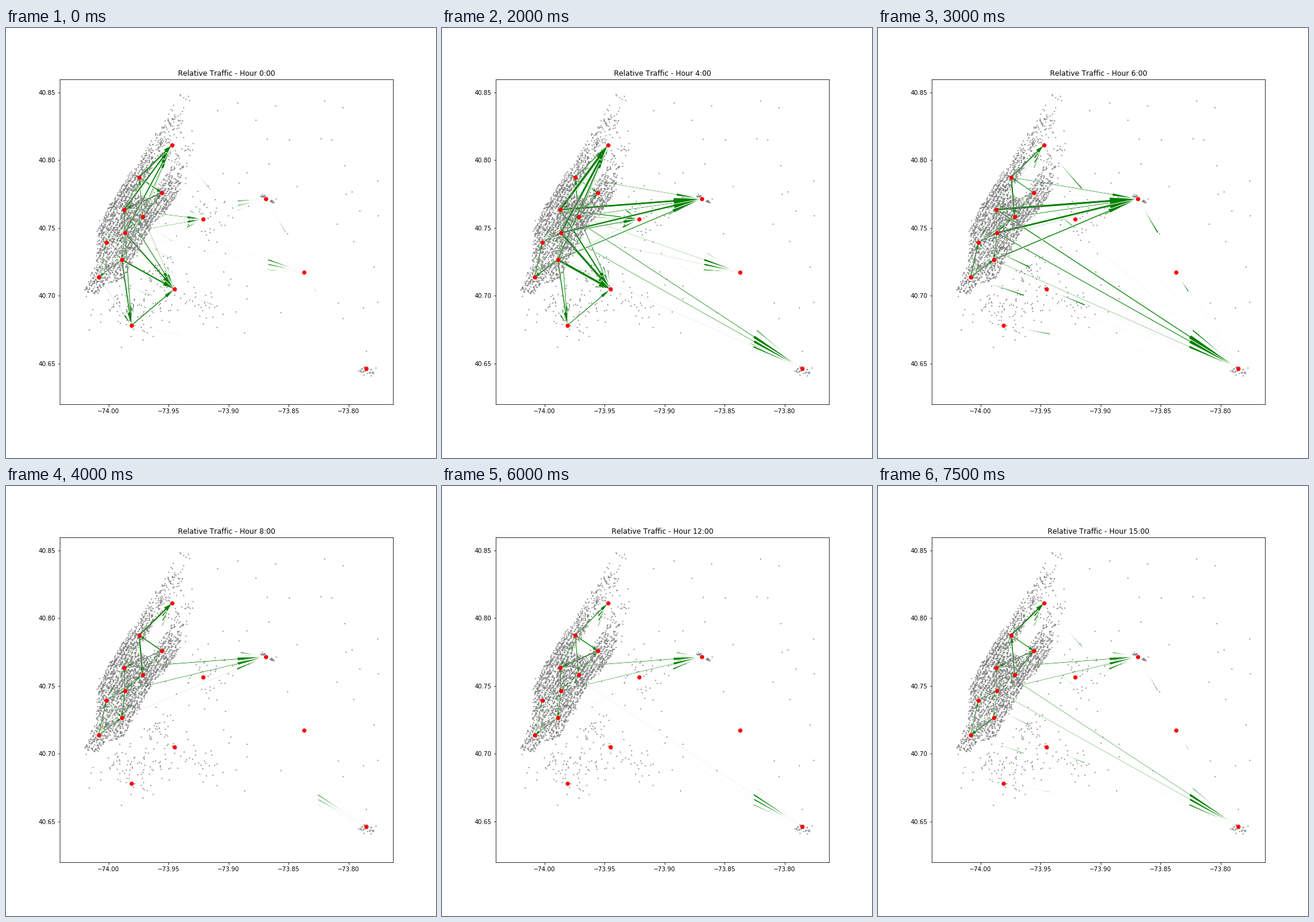
Recreate the animation shown at these times as a matplotlib script. Size 720x720 px, loop 8000 ms.

```python
import itertools

import matplotlib.pyplot as plt
import numpy as np
from matplotlib.animation import FuncAnimation
from matplotlib.collections import PolyCollection

plt.rcParams["font.family"] = "DejaVu Sans"
plt.rcParams["text.kerning_factor"] = 6

HOURS = 16
hour = np.arange(HOURS)
rng = np.random.default_rng(7)

# Zone centres in stage pixels; A to I lie on the island
ZONES = {
    "A": (278, 196), "B": (223, 250), "C": (261, 276), "D": (198, 304),
    "E": (229, 316), "F": (199, 343), "G": (168, 359), "H": (194, 388),
    "I": (155, 417), "J": (330, 320), "K": (282, 437), "L": (210, 498),
    "M": (435, 286), "N": (499, 409), "O": (603, 570),
}
ISLAND = "ABCDEFGHI"
OUTFLOW = dict(B=0.4, C=0.25, D=1, E=0.45, F=0.9, G=0.3, H=0.6, I=0.2)


def bump(peak, width):
    return np.exp(-(((hour - peak) / width) ** 2))


night = 1 / (1 + np.exp(3 * (hour - 4.7)))
day = 1 - night
late = night * (0.65 + 0.1 * hour)

# Head width in pixels by hour, and how much nearness counts
INBOUND = {
    "A": (14 * late + 3 * day, 0),
    "J": (7 * late + 0.8 * day, 1),
    "K": (14 * late, 2),
    "L": (8 * night, 2),
    "M": (2.2 * night + 5 * day + 11 * bump(4.9, 1.7), 0),
    "N": (4 * late, 0),
    "O": (8 * bump(5, 1.5) + 1.8 * day + 2.7 * bump(15, 3.5), 0),
}
FROM_O = 1.6 * bump(0, 1.2) + 2.8 * bump(6, 1.2) + 1.8 * bump(15, 2.5)
FROM_M = 1.7 * bump(0, 1.2) + 1.2 * bump(6, 1.2) + 2.2 * bump(15, 3)


def gap(a, b):
    return np.hypot(*np.subtract(ZONES[a], ZONES[b]))


def build_flows():
    flows = {}
    for a, b in itertools.permutations(ISLAND, 2):
        size = rng.uniform(1.5, 5.5) * np.clip(80 / gap(a, b), 0.4, 1.2)
        flows[a + b] = size * (1 + 0.25 * np.sin(0.5 * hour + rng.uniform(0, 6.3)))
    for end, (curve, pull) in INBOUND.items():
        share = {a: w / gap(a, end) ** pull for a, w in OUTFLOW.items()}
        top = max(share.values())
        flows.update({a + end: curve * s / top for a, s in share.items()})
    for end in "ACDFGIKLMN":
        flows["O" + end] = FROM_O * rng.uniform(0.7, 1)
    for end in "ACDEF":
        flows["M" + end] = FROM_M * rng.uniform(0.5, 1)
    flows["BA"] = 8 + 1.5 * np.cos(0.8 * hour)
    flows["BE"] = 6 * day + 4 * bump(7, 2)
    flows["LK"] = 7 * night
    return flows


def arrow(a, b, head):
    """Outline of an arrow whose head takes a fifth of its length."""
    a, b = np.array(ZONES[a], float), np.array(ZONES[b], float)
    d = b - a
    side = np.array([-d[1], d[0]]) / np.hypot(*d)
    neck = b - 0.2 * d
    w, h = side * head / 6, side * head / 2
    return np.array([a + w, neck + w, neck + h, b, neck - h, neck - w, a - w])


def island_dots(n):
    """Dots on a slanted street grid: t runs along avenues, s across."""
    t = rng.uniform(-145, 228, n)
    s = rng.uniform(0, 90, n)
    west = np.interp(t, [-145, -95, -77, -40, 0], [42, 33, 24, 3, 0])
    east = np.interp(t, [-145, -122, -100, 0, 62, 160, 168, 228],
                     [60, 62, 86, 78, 86, 62, 28, 14])
    park = (t > 42) & (t < 112) & (s > 25) & (s < 52)
    keep = 0.6 + 0.4 * np.exp(-(((t - 15) / 55) ** 2))
    keep *= np.exp(-np.clip(t - 100, 0, None) / 55)
    keep[(t > 95) & (s > 28)] *= 0.35
    ok = (s > west) & (s < east) & ~park & (rng.random(n) < keep)
    t, s = t[ok], s[ok]
    lane = np.round(s / 5.2) * 5.2 + rng.normal(0, 0.8, len(s))
    s = np.where(rng.random(len(s)) < 0.65, lane, s)
    return np.column_stack([172 + 0.54 * t + 0.903 * s,
                            300 - 0.842 * t + 0.429 * s])


def cluster(x, y, sx, sy, n):
    return rng.normal((x, y), (sx, sy), (n, 2))


dots = np.vstack([
    island_dots(7800),
    cluster(215, 472, 32, 22, 95),
    cluster(255, 408, 15, 20, 40),
    cluster(325, 455, 28, 22, 30),
    cluster(345, 320, 26, 26, 45),
    cluster(430, 281, 2, 1, 14),
    cluster(446, 290, 3, 1.5, 14),
    cluster(604, 573, 8, 4, 30),
    rng.uniform((290, 120), (630, 560), (45, 2)),
])
flows = build_flows()

fig, ax = plt.subplots(figsize=(10, 10), dpi=72, facecolor="white")
fig.subplots_adjust(left=0.125, right=0.9, bottom=0.125, top=0.88)
ax.set_xlim(90, 648)
ax.set_ylim(630, 86.4)
steps = np.arange(5)
ax.set_xticks(171.7 + 100.5 * steps, [f"\u2212{74 - 0.05 * k:.2f}" for k in steps])
ax.set_yticks(107.7 + 113.55 * steps, [f"{40.85 - 0.05 * k:.2f}" for k in steps])

arrows = PolyCollection([], facecolor="green", edgecolor="white",
                        linewidth=1, joinstyle="miter", zorder=1)
ax.add_collection(arrows, autolim=False)
ax.scatter(dots[:, 0], dots[:, 1], s=1, color="gray", linewidths=1, zorder=2)
ax.plot(*zip(*ZONES.values()), "o", color="red", markersize=6, zorder=3)
title = ax.set_title("", fontsize=12)


def update(h):
    # Heavier flows lie on top
    ranked = sorted(flows.items(), key=lambda flow: flow[1][h])
    arrows.set_verts([arrow(*pair, size[h]) for pair, size in ranked if size[h] > 0.4])
    title.set_text(f"Relative Traffic - Hour {h}:00")
    return arrows, title


anim = FuncAnimation(fig, update, frames=HOURS, interval=500,
                     repeat=True, repeat_delay=0, blit=False)
plt.show()
```
